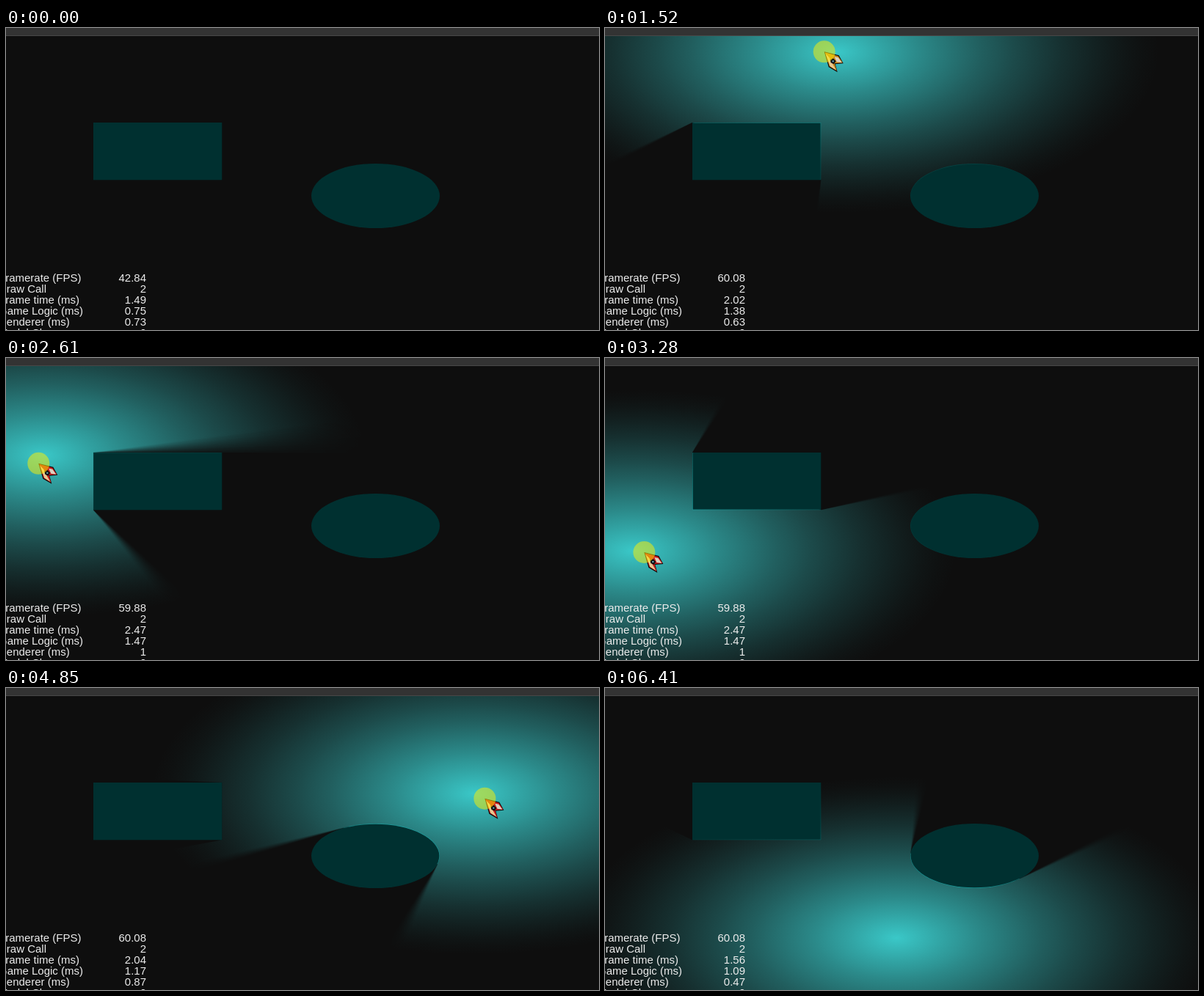
An HTML page with a canvas that plays this animation: 808 by 412 pixels, repeating every 6.47 s.

```html
<!DOCTYPE html>
<html lang="en">
<head>
<meta charset="utf-8">
<title>Soft shadow light</title>
<style>
html, body { margin: 0; width: 100%; height: 100%; overflow: hidden; background: #0e0e0e; }
canvas { display: block; }
</style>
</head>
<body>
<canvas id="stage" width="808" height="412"></canvas>
<script>
const W = 808, H = 412, LOOP = 6470, STEP = LOOP / 95;
const LIGHT_ON = 1000, CURSOR_IN = 400, CURSOR_OUT = 6330, LAG = 50;
const SAMPLES = 51, SOURCE = 12, REACH = 440, SQUASH = 0.5;

function layer() {
  const c = document.createElement('canvas');
  c.width = W;
  c.height = H;
  return c.getContext('2d');
}
const ctx = document.getElementById('stage').getContext('2d');
const light = layer(), shade = layer();

// Pointer key points: time, x, y
const path = [
  [400, 628, 432], [900, 498, 92], [2060, 136, 55], [2900, 18, 205],
  [3280, 53, 265], [3890, 361, 212], [4400, 500, 120], [4850, 653, 151],
  [5200, 705, 230], [5650, 590, 350], [6180, 397, 341]
];

// Milliseconds per second of play; the frame time is their sum
const logic = [0.754, 1.02, 1.384, 1.47, 1.314, 1.17, 1.09];
const render = [0.734, 0.5, 0.634, 1, 0.834, 0.87, 0.47];

const box = { x: 119, y: 129, w: 175.3, h: 78.3 };
const oval = { x: 503.5, y: 229, rx: 87.5, ry: 44 };

const onOval = a => [oval.x + oval.rx * Math.cos(a), oval.y + oval.ry * Math.sin(a)];
const casters = [
  {
    mid: [box.x + box.w / 2, box.y + box.h / 2],
    edge: [[0, 0], [1, 0], [1, 1], [0, 1]]
      .map(([u, v]) => [box.x + u * box.w, box.y + v * box.h])
  },
  {
    mid: [oval.x, oval.y],
    edge: Array.from({ length: 72 }, (_, i) => onOval(i * Math.PI / 36))
  }
];

// Points spread evenly over the light source
const source = Array.from({ length: SAMPLES }, (_, i) => {
  const r = SOURCE * Math.sqrt((i + 0.5) / SAMPLES), a = i * 2.39996;
  return [r * Math.cos(a), r * Math.sin(a) * SQUASH];
});

// Smooth curve through the key points
function pointer(t) {
  const end = path.length - 1;
  let i = 0;
  while (i < end - 1 && path[i + 1][0] <= t) i++;
  const a = path[i], b = path[i + 1];
  const before = path[Math.max(0, i - 1)], after = path[Math.min(end, i + 2)];
  const d = b[0] - a[0], u = Math.max(0, Math.min(1, (t - a[0]) / d));
  return [1, 2].map(k => {
    const m = (b[k] - before[k]) / (b[0] - before[0]) * d;
    const n = (after[k] - a[k]) / (after[0] - a[0]) * d;
    return (2 * u ** 3 - 3 * u * u + 1) * a[k] + (u ** 3 - 2 * u * u + u) * m
      + (3 * u * u - 2 * u ** 3) * b[k] + (u ** 3 - u * u) * n;
  });
}

// Area hidden behind a convex shape, bounded by its two tangents
function addShadow(c, [lx, ly], { mid, edge }) {
  const mx = mid[0] - lx, my = mid[1] - ly;
  let lo = Infinity, hi = -Infinity, first, last;
  for (const p of edge) {
    const x = p[0] - lx, y = p[1] - ly;
    const a = Math.atan2(mx * y - my * x, mx * x + my * y);
    if (a < lo) { lo = a; first = p; }
    if (a > hi) { hi = a; last = p; }
  }
  const far = ([x, y]) => {
    const k = 4000 / Math.hypot(x - lx, y - ly);
    return [x + (x - lx) * k, y + (y - ly) * k];
  };
  c.moveTo(...first);
  for (const p of [far(first), far(mid), far(last), last]) c.lineTo(...p);
  c.closePath();
}

function drawLight([x, y]) {
  light.globalCompositeOperation = 'source-over';
  light.clearRect(0, 0, W, H);
  light.save();
  light.translate(x, y);
  light.scale(1, SQUASH);
  const g = light.createRadialGradient(0, 0, 0, 0, 0, REACH);
  for (let d = 0; d <= 20; d++) {
    g.addColorStop(d / 20, `rgba(44,186,186,${(1 - d / 20) ** 1.4})`);
  }
  light.fillStyle = g;
  light.fillRect(-REACH, -REACH, REACH * 2, REACH * 2);
  light.restore();

  shade.globalCompositeOperation = 'source-over';
  shade.clearRect(0, 0, W, H);
  shade.globalCompositeOperation = 'lighter';
  shade.fillStyle = `rgba(0,0,0,${1 / SAMPLES})`;
  for (const [dx, dy] of source) {
    shade.beginPath();
    for (const c of casters) addShadow(shade, [x + dx, y + dy], c);
    shade.fill();
  }
  light.globalCompositeOperation = 'destination-out';
  light.drawImage(shade.canvas, 0, 0);

  ctx.globalCompositeOperation = 'lighter';
  ctx.drawImage(light.canvas, 0, 0);
  ctx.globalCompositeOperation = 'source-over';
}

// A small inset leaves a lit rim
function drawShapes(inset) {
  ctx.fillStyle = '#003030';
  ctx.fillRect(box.x + inset, box.y + inset, box.w - 2 * inset, box.h - 2 * inset);
  ctx.beginPath();
  ctx.ellipse(oval.x, oval.y, oval.rx - inset, oval.ry - inset, 0, 0, 7);
  ctx.fill();
}

function poly(points, fill) {
  ctx.beginPath();
  points.forEach(p => ctx.lineTo(...p));
  ctx.closePath();
  ctx.fillStyle = fill;
  ctx.fill();
}

function drawPointer([x, y], second, lit) {
  const hue = second % 2 ? 0 : 38;
  ctx.save();
  ctx.translate(x, y);
  poly([[0, 0], [20, 5], [26, 16], [15, 17], [18, 28], [6, 21]], lit ? '#180808' : '#c01010');
  poly([[1, 1], [19, 6], [25, 15], [14, 16], [17, 26], [7, 20]], `hsl(${hue},75%,45%)`);
  poly([[14, 7], [19, 8], [24, 15], [17, 14]], '#dcd0c0');
  poly([[2, 3], [7, 8], [12, 18], [16, 25], [8, 20]], '#e8c890');
  poly([[8, 11], [12, 9], [16, 13], [13, 17], [9, 15]], '#101014');
  ctx.fillStyle = '#70b8c0';
  ctx.fillRect(11, 12, 2, 2);
  ctx.fillStyle = 'rgba(255,240,0,0.5)';
  ctx.beginPath();
  ctx.arc(0, 0, 15, 0, 7);
  ctx.fill();
  ctx.restore();
}

function drawStats(second) {
  const a = logic[second], b = render[second];
  const fps = second === 0 ? 42.84 : second === 3 ? 59.88 : 60.08;
  const rows = [
    ['Framerate (FPS)', fps], ['Draw Call', 2], ['Frame time (ms)', a + b],
    ['Game Logic (ms)', a], ['Renderer (ms)', b], ['Model Class', 0]
  ];
  ctx.font = '15px "Liberation Sans", Arial, sans-serif';
  ctx.fillStyle = '#ececec';
  rows.forEach(([label, value], i) => {
    const y = 346 + i * 15;
    ctx.textAlign = 'left';
    ctx.fillText(label, -10, y);
    ctx.textAlign = 'right';
    ctx.fillText(+value.toFixed(2), 191, y);
  });
}

function draw(t) {
  const second = Math.round(t / 1000), lit = t >= LIGHT_ON;
  ctx.fillStyle = '#0e0e0e';
  ctx.fillRect(0, 0, W, H);
  drawShapes(0);
  if (lit) {
    drawLight(pointer(t - LAG));
    drawShapes(0.7);
  }
  drawStats(second);
  if (t >= CURSOR_IN && t < CURSOR_OUT) drawPointer(pointer(t), second, lit);
  ctx.fillStyle = '#333333';
  ctx.fillRect(0, 0, W, 10);
  ctx.fillStyle = '#484848';
  ctx.fillRect(0, 10, W, 1);
}

const begin = performance.now();
let shown = -1;
function tick() {
  const t = (performance.now() - begin) % LOOP;
  const step = Math.floor(t / STEP);
  if (step !== shown) {
    shown = step;
    draw(step * STEP + 12);
  }
  requestAnimationFrame(tick);
}
tick();
</script>
</body>
</html>
```
